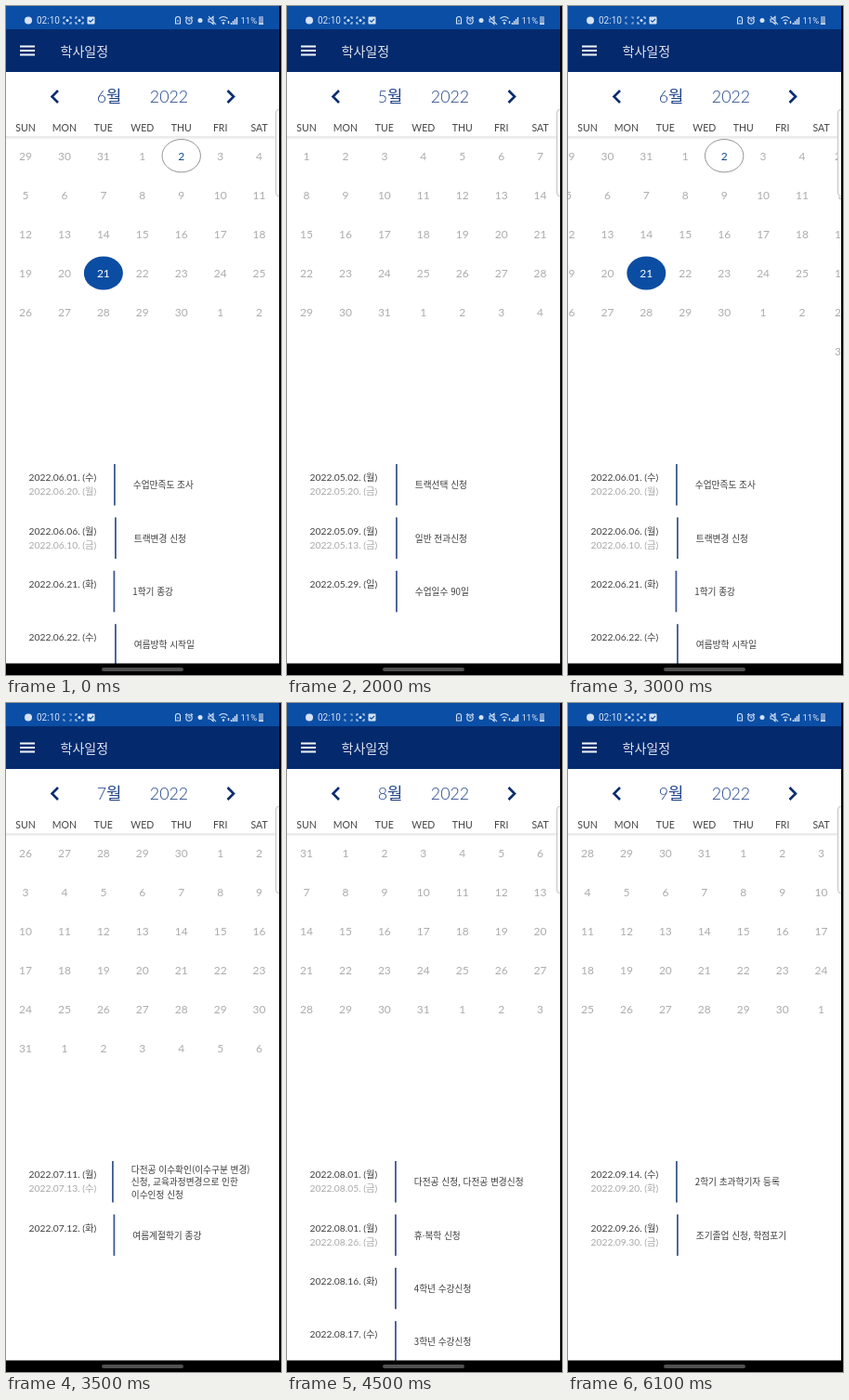
An HTML page for the animation above (6.2 s loop, 296 by 720 pixels).

```html
<!DOCTYPE html>
<html lang="ko">
<head>
<meta charset="utf-8">
<style>
html, body { margin: 0; width: 100%; height: 100%; overflow: hidden; background: #fff; }
svg { display: block; width: 296px; height: 720px; font-family: Lato, "Noto Sans CJK KR", "Noto Sans CJK", sans-serif; }
.mid { text-anchor: middle; }
.day { font-size: 12px; }
.week { font-size: 10.5px; fill: #444; }
.head { font-size: 17.8px; font-weight: 300; fill: #1f4389; }
.date { font-size: 10.3px; fill: #404040; }
.end { fill: #a8a8a8; }
.item { font-size: 9.7px; fill: #3a3a3a; font-family: "Noto Sans CJK KR", "Noto Sans CJK", sans-serif; }
.bar { fill: none; stroke: #d5e2f4; stroke-width: 1.1; }
.solid { fill: #d5e2f4; }
.status { font: 10px Roboto, sans-serif; fill: #d5e2f4; }
</style>
</head>
<body>
<svg viewBox="0 0 296 720">
  <rect width="296" height="720" fill="#fff"/>
  <g id="pages"></g>
  <rect y="71" width="296" height="70" fill="#fff"/>
  <rect y="140.5" width="296" height="1" fill="#d5d5d5"/>
  <rect y="141.5" width="296" height="1.5" fill="#f1f1f1"/>
  <g id="weekdays"></g>
  <path d="M56 91 49.5 97.5 56 104M238.5 91 245 97.5 238.5 104" fill="none" stroke="#0b2d70" stroke-width="2.6"/>
  <text class="head mid" x="175.5" y="104">2022</text>
  <g id="months"></g>

  <rect width="296" height="26" fill="#0b4ea5"/>
  <rect y="25" width="296" height="46" fill="#042a6d"/>
  <path d="M15 43.5H31M15 48H31M15 52.5H31" stroke="#f2f5fa" stroke-width="1.8"/>
  <text x="58.5" y="53.5" font-size="14" font-weight="300" fill="#dfe5ef">학사일정</text>

  <circle class="solid" cx="24" cy="15.5" r="4"/>
  <text class="status" x="33" y="19.2">02:10</text>
  <g class="bar">
    <path id="scan" d="M62 14V12H64M68 12H70V14M70 17V19H68M64 19H62V17"/>
    <path d="M75 14V12H77M81 12H83V14M83 17V19H81M77 19H75V17"/>
  </g>
  <circle id="scanDot" class="solid" cx="66" cy="15.5" r="1.5"/>
  <circle class="solid" cx="79" cy="15.5" r="1.5"/>
  <rect class="solid" x="87.5" y="11.5" width="8" height="8" rx="1"/>
  <path d="M89.3 15.5 91 17.2 94 13.8" fill="none" stroke="#0b4ea5" stroke-width="1.2"/>
  <g class="bar">
    <path d="M182.5 19V14Q182.5 11.5 185 11.5T187.5 14V19ZM184 16H186"/>
    <circle cx="197" cy="16" r="3.2"/>
    <path d="M197 14V16H198.5M193 13 195 11.5M201 13 199 11.5"/>
    <path d="M218 14H220L223 11.5V19.5L220 17H218ZM218 11 226 20"/>
    <path d="M229.5 13.5Q234 9.5 238.5 13.5M231.5 16Q234 14 236.5 16"/>
    <path d="M239.5 16V19M242.5 18V20M244.5 16V20M246.5 14V20M248.5 12V20" stroke-width="1.4"/>
  </g>
  <circle class="solid" cx="209" cy="15.5" r="2.5"/>
  <circle class="solid" cx="234" cy="18.5" r="1.2"/>
  <text class="status" x="252.5" y="19.2" style="font-size:9.5px">11%</text>
  <rect x="272" y="11" width="5" height="9" rx="1" fill="#7d9ccb"/>
  <rect class="solid" x="272" y="18.5" width="5" height="1.5"/>

  <path d="M296 111H294Q290.5 111 290.5 115V201Q290.5 205 294 205H296" fill="#fafafa" stroke="#c4c4c4"/>
  <rect x="294" width="2" height="720" fill="#000"/>
  <g id="lists"></g>
  <rect y="707.5" width="296" height="12.5" fill="#000"/>
  <rect x="103" y="712" width="88" height="4" rx="2" fill="#505050"/>
</svg>
<script>
const LOOP = 6200, STEP = 100, PAGE = 293.6, COL = 41.93, ROW = 42.1;
const $ = id => document.getElementById(id);

function add(parent, tag, attrs, text = '') {
  const node = document.createElementNS('http://www.w3.org/2000/svg', tag);
  for (const key in attrs) node.setAttribute(key, attrs[key]);
  node.textContent = text;
  return parent.appendChild(node);
}

// Each event: divider x, start date, end date, title lines
const months = [
  { month: 5, rows: 5, events: [
    [118, '05.02. (월)', '05.20. (금)', '트랙선택 신청'],
    [118, '05.09. (월)', '05.13. (금)', '일반 전과신청'],
    [118, '05.29. (일)', '', '수업일수 90일']] },
  { month: 6, rows: 5, events: [
    [117, '06.01. (수)', '06.20. (월)', '수업만족도 조사'],
    [118, '06.06. (월)', '06.10. (금)', '트랙변경 신청'],
    [116.5, '06.21. (화)', '', '1학기 종강'],
    [118, '06.22. (수)', '', '여름방학 시작일']] },
  { month: 7, rows: 6, events: [
    [115, '07.11. (월)', '07.13. (수)', '다전공 이수확인(이수구분 변경)', '신청, 교육과정변경으로 인한', '이수인정 신청'],
    [116.5, '07.12. (화)', '', '여름계절학기 종강']] },
  { month: 8, rows: 5, events: [
    [117, '08.01. (월)', '08.05. (금)', '다전공 신청, 다전공 변경신청'],
    [117, '08.01. (월)', '08.26. (금)', '휴·복학 신청'],
    [117, '08.16. (화)', '', '4학년 수강신청'],
    [117, '08.17. (수)', '', '3학년 수강신청']] },
  { month: 9, rows: 5, events: [
    [117, '09.14. (수)', '09.20. (화)', '2학기 초과학기자 등록'],
    [118, '09.26. (월)', '09.30. (금)', '조기졸업 신청, 학점포기']] }
];

function drawPage({ month, rows }, index) {
  const page = add($('pages'), 'g', { transform: `translate(${index * PAGE})` });
  const lead = new Date(2022, month - 1, 1).getDay();
  for (let i = 0; i < rows * 7; i++) {
    const date = new Date(2022, month - 1, 1 - lead + i);
    const day = date.getDate(), inJune = month === 6 && date.getMonth() === 5;
    const x = 21 + (i % 7) * COL, y = 161.2 + Math.floor(i / 7) * ROW;
    let fill = '#acacac';
    if (inJune && day === 21) {
      add(page, 'ellipse', { cx: x, cy: y, rx: 21, ry: 18, fill: '#0b4da2' });
      fill = '#fff';
    } else if (inJune && day === 2) {
      add(page, 'ellipse', { cx: x, cy: y, rx: 20.7, ry: 17.7, fill: '#fff', stroke: '#888', 'stroke-width': .9 });
      fill = '#164a98';
    }
    add(page, 'text', { class: 'day mid', x, y: y + 4.4, fill }, day);
  }
}

function drawList({ events }) {
  const list = add($('lists'), 'g', {});
  events.forEach(([x, start, end, ...lines], i) => {
    const y = 515.4 + i * 57.4;
    add(list, 'text', { class: 'date', x: 24.5, y: y - 4.2 }, '2022.' + start);
    if (end) add(list, 'text', { class: 'date end', x: 24.5, y: y + 11 }, '2022.' + end);
    add(list, 'rect', { x: x - 1, y: y - 22.4, width: 1.8, height: 44.5, fill: '#3d5990' });
    lines.forEach((line, n) => add(list, 'text',
      { class: 'item', x: x + 19.8, y: y + 3.8 + (n - (lines.length - 1) / 2) * 13.5 }, line));
  });
  return list;
}

['SUN', 'MON', 'TUE', 'WED', 'THU', 'FRI', 'SAT'].forEach((name, i) =>
  add($('weekdays'), 'text', { class: 'week mid', x: 21 + i * COL, y: 135 }, name));
months.forEach(drawPage);
const lists = months.map(drawList);
const labels = months.map(m => add($('months'), 'text', { class: 'head mid', x: 111, y: 104 }, m.month + '월'));

// Swipes as [start, from, to]; progress is sampled every STEP
const swipes = [[0, 1, 0], [2000, 0, 1], [2900, 1, 2], [3900, 2, 3], [4900, 3, 4]];
const progress = [0, .07, .4, .75, .918, .98, 1];

function draw(now) {
  const t = Math.floor(now % LOOP / STEP) * STEP;
  const [start, from, to] = swipes.filter(s => s[0] <= t).pop();
  const step = Math.min((t - start) / STEP, progress.length - 1);
  const position = from + (to - from) * progress[step];
  const current = progress[step] === 1 ? to : from;
  $('pages').setAttribute('transform', `translate(${-position * PAGE})`);
  months.forEach((_, i) => {
    const visibility = i === current ? 'visible' : 'hidden';
    lists[i].setAttribute('visibility', visibility);
    labels[i].setAttribute('visibility', visibility);
  });
  const dim = (t >= 1000 && t < 1500) || (t >= 3000 && t < 5000);
  $('scanDot').setAttribute('visibility', dim ? 'hidden' : 'visible');
  $('scan').setAttribute('opacity', dim ? .7 : 1);
}

const origin = performance.now();
function tick() {
  draw(performance.now() - origin);
  requestAnimationFrame(tick);
}
tick();
</script>
</body>
</html>
```
